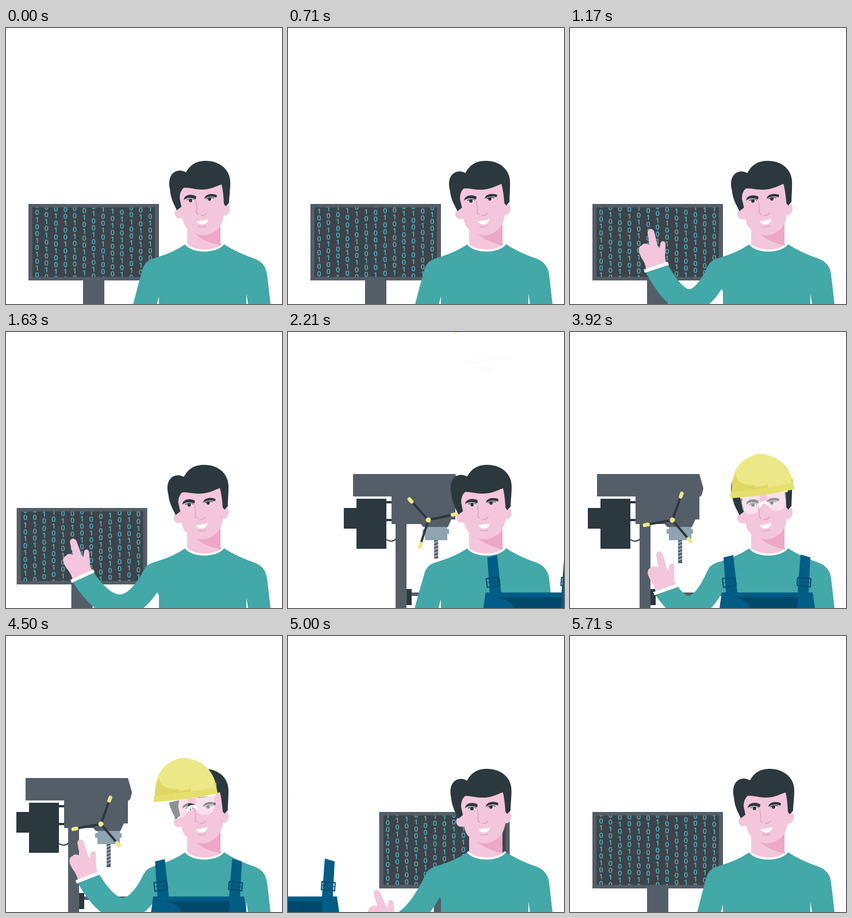
Animation of 480 by 480 pixels, one loop 5.75 s. Source, as an HTML page with a canvas:

```html
<!DOCTYPE html>
<html lang="en">
<head>
<meta charset="utf-8">
<title>Two jobs</title>
<style>
html, body { margin: 0; width: 100%; height: 100%; overflow: hidden; background: #fff; }
canvas { display: block; width: 480px; height: 480px; }
</style>
</head>
<body>
<canvas id="stage" width="480" height="480"></canvas>
<script>
const ctx = document.getElementById('stage').getContext('2d');
const LOOP = 5750, HALF = LOOP / 2;
const SLIDE_TIME = 1200, SLIDE_WIDTH = 485;
const C = {
  teal: '#42a8a8', skin: '#f3c6db', shade: '#eca8c6', line: '#e59dc0', hair: '#2b383e',
  steel: '#545e68', screen: '#3d4449', digit: '#4fb6d2', chuck: '#8fa3b0',
  yellow: '#ede887', gold: '#ded862', brim: '#e5df6e', blue: '#005d86', navy: '#00496c'
};

const clamp = p => Math.min(1, Math.max(0, p));
const mod = (a, n) => ((a % n) + n) % n;
const mix = (a, b, p) => a + (b - a) * p;
const sine = p => (1 - Math.cos(Math.PI * clamp(p))) / 2;
const cubic = p => (p = clamp(p)) < 0.5 ? 4 * p ** 3 : 1 - 4 * (1 - p) ** 3;
const slide = (t, start) => SLIDE_WIDTH * cubic((t - start) / SLIDE_TIME);

function fill(d, color) {
  ctx.fillStyle = color;
  ctx.fill(new Path2D(d));
}
function stroke(d, color, width, cap = 'butt') {
  ctx.strokeStyle = color;
  ctx.lineWidth = width;
  ctx.lineCap = cap;
  ctx.stroke(new Path2D(d));
}
function rect(x, y, w, h, color) {
  ctx.fillStyle = color;
  ctx.fillRect(x, y, w, h);
}
function disc(x, y, r, color) {
  ctx.fillStyle = color;
  ctx.beginPath();
  ctx.arc(x, y, r, 0, 7);
  ctx.fill();
}
function group(x, y, draw) {
  ctx.save();
  ctx.translate(x, y);
  draw();
  ctx.restore();
}
function withTilt(angle, draw) {
  ctx.save();
  ctx.translate(345, 385);
  ctx.rotate(angle);
  ctx.translate(-345, -385);
  draw();
  ctx.restore();
}

// Monitor: neighbouring columns of digits scroll in opposite directions.
const BITS = '0100101010', ROW = 12.1, SCREEN_TOP = 312;
const PHASES = [9, 12, 15, 3, 2, 5, 11, 3, 7, 8, 13, 4, 3];

function drawMonitor(t) {
  rect(134, 438, 37, 42, C.steel);
  rect(39, 306, 227, 133, C.steel);
  ctx.beginPath();
  ctx.rect(46, SCREEN_TOP, 213, 121);
  ctx.clip();
  rect(46, SCREEN_TOP, 213, 121, C.screen);
  ctx.fillStyle = C.digit;
  ctx.font = '600 12.5px "Open Sans", "Noto Sans", sans-serif';
  ctx.textAlign = 'center';
  PHASES.forEach((phase, col) => {
    const travel = (col % 2 ? 1 : -1) * 10 * ROW * t / LOOP;
    const shift = mod(phase + travel, 10 * ROW);
    for (let row = -11; row <= 11; row++) {
      const y = shift + row * ROW;
      if (y < -8 || y > 130) continue;
      ctx.fillText(BITS[mod(row + col * 3, 10)], 54 + col * 16.4, SCREEN_TOP + y + 4.5);
    }
  });
}

function drawDrill(t) {
  const turn = sine((t - 2210) / 870);
  const drop = 8 * turn;
  stroke('M105 296H116M105 327H116', C.hair, 4);
  stroke('M105 361Q114 367 122 360', C.hair, 2);
  rect(53, 290, 52, 87, C.hair);
  rect(31, 306, 23, 36, C.hair);
  rect(149, 453, 140, 6, C.steel);
  rect(140, 447, 9, 28, C.hair);
  rect(121, 330, 19, 150, C.steel);

  const bitEnd = 394 + drop;
  rect(188, 360, 7, bitEnd - 360, C.steel);
  for (let y = 364; y < bitEnd - 2; y += 6) stroke(`M188 ${y + 3}L195 ${y}`, '#a5b2bb', 2);
  rect(172, 338, 39, 24, C.chuck);
  rect(168, 343, 46, 8, C.chuck);
  fill('M47 247H225L232 272L229 284L225 287V326H218L212 339H169L165 334H114V286H47Z', C.steel);

  ctx.translate(178, 327);
  ctx.rotate(mix(-12.3, -70.4, turn) * Math.PI / 180);
  for (let arm = 0; arm < 3; arm++) {
    stroke('M0 0H42', C.hair, 4);
    stroke('M43 0H49', C.yellow, 6.5, 'round');
    ctx.rotate(Math.PI * 2 / 3);
  }
  disc(0, 0, 4.5, C.yellow);
}

// Arm: wrist position, bend point and hand angle between three poses.
const REST = { x: 224, y: 560, bx: 238, by: 490, angle: 0 };
const RAISED = { x: 150, y: 416, bx: 208, by: 528, angle: 6 };
const SWIPED = { x: 110, y: 436, bx: 190, by: 530, angle: -9 };

function blend(a, b, p) {
  const pose = {};
  for (const key in a) pose[key] = mix(a[key], b[key], p);
  return pose;
}
function armPose(u) {
  if (u < 1450) return blend(REST, RAISED, sine((u - 690) / 430));
  if (u < 1850) return blend(RAISED, SWIPED, sine((u - 1450) / 400));
  return blend(SWIPED, REST, sine((u - 1850) / 400));
}
function drawArm(u) {
  const p = armPose(u);
  stroke(`M257 424Q${p.bx} ${p.by} ${p.x} ${p.y}`, C.teal, 40);
  disc(257, 424, 20, C.teal);
  ctx.save();
  ctx.translate(p.x, p.y);
  ctx.rotate(p.angle * Math.PI / 180);
  fill('M-17 6C-20-8-28-12-31-20C-35-26-34-34-29-35C-27-39-22-40-16-37L-21-57C-23-66-13-68-10-61L-3-42Q-1-34 2-34L3-41C3-48 12-48 12-40L13-24C13-17 16-12 18-5Z', C.skin);
  stroke('M-20 9L20-9', '#fff', 6);
  ctx.restore();
}

function drawBody() {
  fill('M312 376Q292 390 262 399Q245 403 241 412L266 458V480H418V462L421 480H460L454 428Q451 408 432 401Q402 391 379 376Z', C.teal);
  fill('M315 335H373V378Q363 386 344 386Q326 386 315 378Z', C.skin);
  fill('M317 346Q338 371 373 378V330Z', C.shade);
  stroke('M312.5 375C324 391 366 391 378 375', '#fff', 3.5);
}

function drawHead() {
  fill('M300 316C291 313 291 329 300 331L307 331C309 346 318 353 330 358C343 363 354 360 364 353C373 347 377 337 379 326C389 328 394 309 384 306L378 270H303Z', C.skin);
  fill('M297 317C292 306 286 296 285 280C281 262 288 249 301 248C308 248 310 250 313 251C322 235 334 231 348 231C371 231 390 246 390 268C390 283 388 295 388 304L382 310L379 306Q378 284 375 272C364 276 355 281 340 281C328 281 318 277 309 278Q302 284 302 296L305 311Z', C.hair);
  fill('M309 299C310 289 324 288 331 293L330 298C322 294 314 295 309 299Z', C.hair);
  fill('M345 297C346 288 360 287 367 291L366 295C358 292 351 293 345 297Z', C.hair);
  stroke('M314 299Q321 296 328 299M348 297Q355 294 362 296', C.hair, 1.2);
  disc(324.5, 300, 2, '#fff');
  disc(357.5, 298, 2, '#fff');
  disc(321, 300, 3, C.hair);
  disc(354, 297.5, 3, C.hair);
  stroke('M330 300L332 314Q329 323 335 324M339 325Q345 328 349 321', C.line, 1.5);
  fill('M331 336Q344 335 352 332Q351 341 341 342Q335 341 331 336Z', '#fff');
  stroke('M335 345Q342 347 349 344', C.line, 1.5);
}

function drawGlasses() {
  ctx.globalAlpha = 0.45;
  fill('M299 285Q315 286 333 283L333 300Q331 316 317 316Q303 315 302 304ZM346 282L379 276V298Q376 311 363 312Q349 312 347 300Z', '#fff');
  ctx.globalAlpha = 1;
  const top = 'M299 286Q340 277 382 277', bridge = 'M333 304Q334 296 340 296Q346 295 348 302';
  for (const d of [top, bridge]) {
    stroke(d, '#ececec', 5);
    stroke(d, '#fff', 4);
  }
}

function drawHelmet() {
  fill('M324 214Q335 209 346 213V220H324Z', C.yellow);
  fill('M285 279C283 241 303 214 335 213C369 212 391 239 392 267Z', C.yellow);
  fill('M285 279Q285 254 294 244C291 257 304 266 327 266L392 257V268Z', C.gold);
  fill('M329 242H331L348 266L326 269Z', C.yellow);
  fill('M348 261L385 257Q390 258 390 266L348 270Z', C.yellow);
  fill('M283 276Q340 273 392 264L394 275Q342 285 282 287Z', C.brim);
}

function drawOveralls() {
  fill('M267 392L284 388L291 453H422L426 480H260L264 453H271Z', C.blue);
  fill('M401 387L418 392L415 453H396Z', C.blue);
  fill('M286 461L397 461L395 480H313Q308 467 286 461Z', C.navy);
  ctx.lineJoin = 'round';
  stroke('M265 429L287 427L289 441L267 444ZM396 427L419 429L418 443L395 441Z', C.navy, 2);
  stroke('M267 436L288 434M396 434L418 436', C.navy, 1.2);
}

function draw(t) {
  const second = t >= HALF;
  const u = second ? t - HALF : t;
  const enter = start => SLIDE_WIDTH - slide(t, start);
  const leave = start => -slide(t, start);

  rect(0, 0, 480, 480, '#fff');
  group(second ? enter(4275) : leave(1368), 0, () => drawMonitor(t));
  group(second ? leave(4275) : enter(1400), 0, () => drawDrill(t));

  const look = sine((u - 350) / 350) - sine((u - 1150) / 1650);
  const tilt = -1.9 * Math.PI / 180 * look;
  drawBody();
  drawArm(second ? u - 60 : u);
  withTilt(tilt, drawHead);
  group(second ? leave(4310) : enter(1425), 0, drawOveralls);

  // Safety gear drops from above, drifting slightly left as it lands.
  const gear = (height, start, time, exit, paint) => {
    const y = -height * (1 - sine((t - start) / time));
    group(leave(exit) - 0.02 * y, y, () => withTilt(y ? 0 : tilt, paint));
  };
  gear(400, 1870, 760, 4270, drawGlasses);
  gear(420, 1875, 880, 4228, drawHelmet);
}

const begin = performance.now();
function tick() {
  draw((performance.now() - begin) % LOOP);
  requestAnimationFrame(tick);
}
tick();
</script>
</body>
</html>
```
